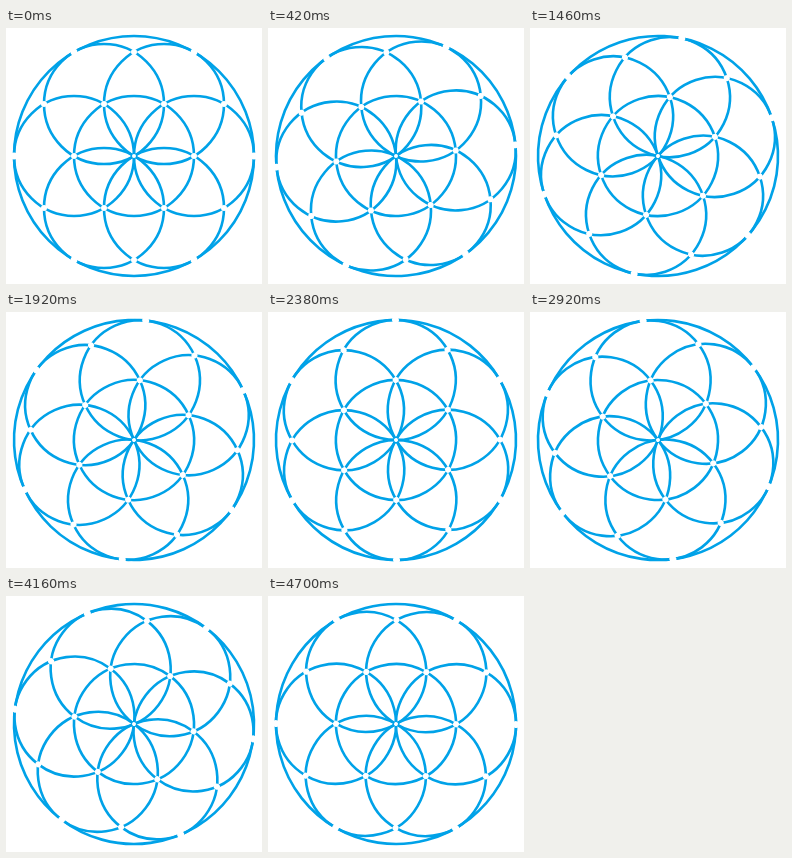
Animation, 256 px wide and 256 px high, one loop 4.72 s. Source, as an HTML page:

```html
<!DOCTYPE html>
<html lang="en">
<head>
<meta charset="utf-8">
<title>Rotating flower</title>
<style>
html, body { margin: 0; width: 100%; height: 100%; overflow: hidden; background: #fff; }
svg { display: block; width: 100vw; height: 100vh; }
</style>
</head>
<body>
<svg viewBox="0 0 256 256">
  <g id="flower">
    <g id="rings" fill="none" stroke="#00a2e8" stroke-width="2.6"></g>
    <g id="gaps" fill="#fff"></g>
  </g>
</svg>
<script>
const LOOP = 4720, STEP = 20, TURN = 60;
const R = 60;
const flower = document.getElementById('flower');
const rings = document.getElementById('rings');
const gaps = document.getElementById('gaps');

function circle(parent, x, y, r) {
  const c = document.createElementNS('http://www.w3.org/2000/svg', 'circle');
  c.setAttribute('cx', x);
  c.setAttribute('cy', y);
  c.setAttribute('r', r);
  parent.appendChild(c);
}

function polar(parent, dist, deg, r) {
  const a = deg * Math.PI / 180;
  circle(parent, dist * Math.cos(a), dist * Math.sin(a), r);
}

circle(rings, 0, 0, 2 * R);
circle(rings, 0, 0, R);
circle(gaps, 0, 0, 2);

// Every crossing of the rings is opened by a small white dot.
for (let k = 0; k < 6; k++) {
  polar(rings, R, k * 60, R);
  polar(gaps, R, k * 60, 3);
  polar(gaps, R * Math.sqrt(3), k * 60 + 30, 3);
  polar(gaps, 2 * R, k * 60, 3.4);
}

function draw(ms) {
  const t = Math.floor((ms % LOOP) / STEP) * STEP;
  flower.setAttribute('transform', `translate(128 128) rotate(${-TURN * t / LOOP})`);
}

const start = performance.now();
function tick() {
  draw(performance.now() - start);
  requestAnimationFrame(tick);
}
tick();
</script>
</body>
</html>
```
